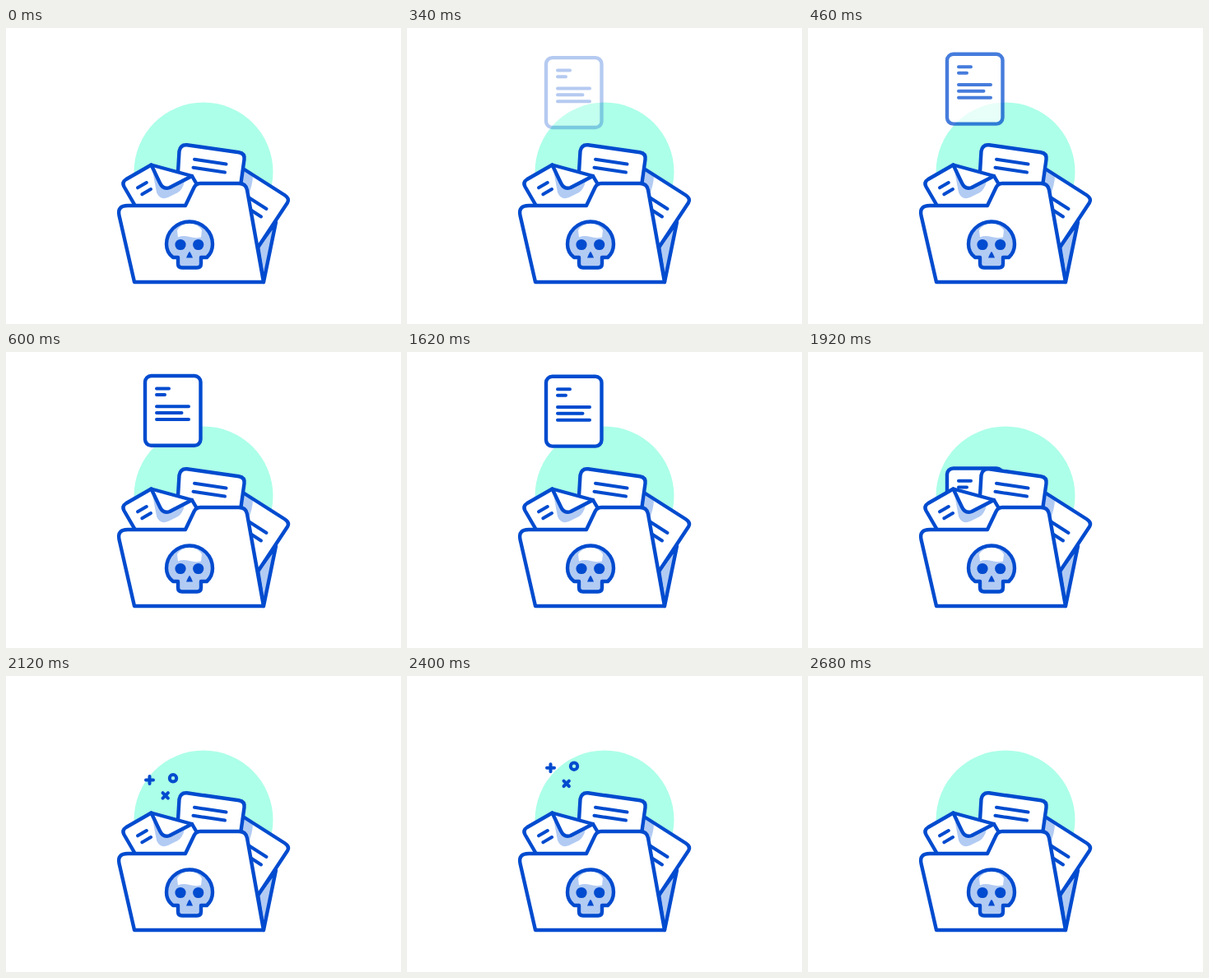
An HTML page for the animation above (3 s loop, 480 by 360 pixels).

```html
<!DOCTYPE html>
<html lang="en">
<head>
<meta charset="utf-8">
<title>Infected folder</title>
<style>
  html, body { margin: 0; width: 100%; height: 100%; overflow: hidden; background: #fff; }
  svg { display: block; width: 100vw; height: 100vh; }
  .ink { fill: none; stroke: #004bcf; stroke-width: 4.4; stroke-linecap: round; stroke-linejoin: round; }
  .paper { fill: #fff; }
  .thin { stroke-width: 4; }
  .shade { fill: #b2cbf3; }
  .solid { fill: #004bcf; }
</style>
</head>
<body>
<svg viewBox="0 0 480 360">
  <circle cx="240" cy="175" r="84.5" fill="#acffe8"/>

  <g id="doc">
    <rect class="ink paper" x="169" y="29" width="67.5" height="84.8" rx="7.5"/>
    <path class="ink thin" d="M183 44.4H198M183 52H193M183 66.3H222M183 74H213.5M183 82H222"/>
  </g>

  <g id="sparks" class="ink thin">
    <path data-x="174.5" data-y="126.5" d="M-4.5 0H4.5M0-4.5V4.5"/>
    <path data-x="193.7" data-y="145.5" d="M-3.2-3.2L3.2 3.2M3.2-3.2L-3.2 3.2"/>
    <circle data-x="203" data-y="124.4" r="4.2"/>
  </g>

  <!-- back panel and right sheet -->
  <path class="ink shade" d="M313 309L328 236L306 266Z"/>
  <path class="paper" d="M286 169L339 203Q345 207 342 212L306 267L290 189Z"/>
  <path class="shade" d="M287 170L300 179Q300 191 294 204L286 189Z"/>
  <path class="ink" d="M288 171L339 203.5Q345 207.500 342 212.500L306 267"/>
  <path class="ink thin" d="M290 203L316.500 220M290 216.500L310 229.500"/>

  <!-- card -->
  <path class="ink paper" d="M208 192L210.500 150Q212 141.500 220 142.300L283 151.300Q290.500 152.500 289.500 160L285 192"/>
  <path class="ink thin" d="M229 159.800L267.500 165.600M227.500 169.800L266 175.600"/>

  <!-- envelope -->
  <path class="ink paper" d="M158 218L143.500 193Q140.500 187.500 146 184L176.500 166.500L226 180L233 192L222 218"/>
  <path class="shade" d="M177 168L183 200Q187 210 197 206L209 200Q214 197 217 187L226 180L203 193Q193 199 188 190Z"/>
  <path class="ink" d="M176.500 166.500L187 188.500Q191 197 199 194L226 180"/>
  <path class="ink thin" d="M160 194.300L170.800 188M165.300 202.300L176 196"/>

  <!-- front panel -->
  <path class="ink paper" d="M156 309L137.500 228Q135 216 148 216H218L228.500 194Q231 189 236 189H283Q291.500 189 293 197L313 309Z"/>

  <!-- skull -->
  <path class="ink shade" d="M203 279C197.500 275 195 269 195 263A28 27.500 0 0 1 251 263C251 269 248.500 275 244 279H237V286.500Q237 291.500 232 291.500H214Q209 291.500 209 286.500V279Z"/>
  <path class="paper" d="M208 246Q213 238 223 238Q233 238 238 246L237 254.500Q230 256 223 254Q215 252 209 254.500Z"/>
  <circle class="solid" cx="212" cy="263.500" r="6.600"/>
  <circle class="solid" cx="233.700" cy="263.500" r="6.600"/>
  <path class="solid" d="M223 272Q224 272 227 279.500H219Q222 272 223 272Z"/>
</svg>
<script>
  const LOOP = 3000;
  const doc = document.getElementById('doc');
  const sparks = document.getElementById('sparks');

  const progress = (t, from, to) => Math.min(1, Math.max(0, (t - from) / (to - from)));
  const smooth = u => u * u * (3 - 2 * u);
  const easeOut = u => 1 - (1 - u) ** 3;

  function render(t) {
    const appear = smooth(progress(t, 200, 600));
    const drop = smooth(progress(t, 1600, 2100));
    doc.setAttribute('transform', `translate(0 ${10 * (1 - appear) + 159 * drop})`);
    doc.setAttribute('opacity', t < 2100 ? appear : 0);

    // The sparks pop out as the sheet lands, drift up and fade.
    const scale = easeOut(progress(t, 1980, 2100));
    const rise = 30 * (easeOut(progress(t, 2000, 2680)) - easeOut(120 / 680));
    sparks.setAttribute('opacity', scale ? 1 - progress(t, 2400, 2680) : 0);
    for (const spark of sparks.children) {
      const { x, y } = spark.dataset;
      spark.setAttribute('transform', `translate(${x} ${y - rise}) scale(${scale})`);
    }
  }

  const start = performance.now();
  function tick() {
    render((performance.now() - start) % LOOP);
    requestAnimationFrame(tick);
  }
  tick();
</script>
</body>
</html>
```
